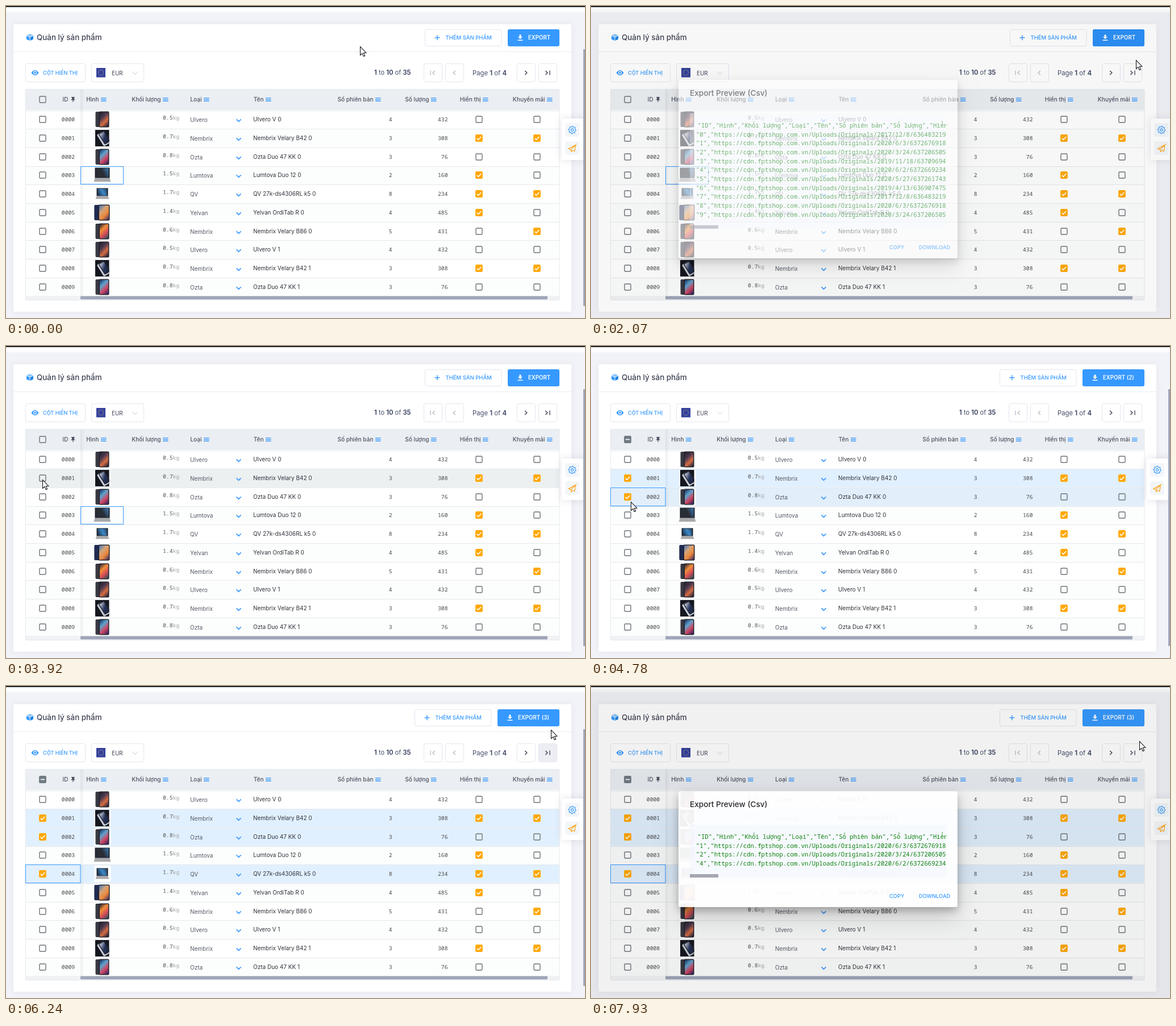
These frames come from a looping animation (1019x549 px, 8000 ms). An HTML page with a canvas:

```html
<!DOCTYPE html>
<html lang="vi">
<head>
<meta charset="utf-8">
<title>Quản lý sản phẩm</title>
<style>
html, body { margin: 0; width: 100%; height: 100%; overflow: hidden; background: #f2f3f8; }
canvas { display: block; width: 1019px; height: 549px; }
</style>
</head>
<body>
<canvas id="stage" width="1019" height="549"></canvas>
<script>
const ctx = document.getElementById('stage').getContext('2d');
const W = 1019, H = 549, LOOP = 8000, TICK = 77;
const SANS = 'Inter, "Open Sans", sans-serif';
const MONO = '"Noto Sans Mono", "DejaVu Sans Mono", monospace';
const BLUE = '#3699ff', ORANGE = '#ffa800', LINE = '#e4e6ef', DARK = '#3f4254', GREY = '#9fa5b9';
const TOP = 183.5, PITCH = 32.7, COUNT = 10;

// the table repeats these products, numbering each round
const products = [
  { type: 'Ulvero', name: 'Ulvero V', kg: '0.5', forms: '4', stock: '432', file: '2017/12/8/636483219',
    look: 'phone', colors: ['#27232f', '#4d3950', '#d66c43', '#2a2638'] },
  { type: 'Nembrix', name: 'Nembrix Velary B42', kg: '0.7', forms: '3', stock: '308', shown: true, sale: true,
    file: '2020/6/3/6372676918', look: 'tilted', colors: ['#c9cfdb', '#26345c', '#1b2238'] },
  { type: 'Ozta', name: 'Ozta Duo 47 KK', kg: '0.8', forms: '3', stock: '76', file: '2020/3/24/637206505',
    look: 'phone', colors: ['#1d3b6b', '#5fa3cc', '#d14460', '#3a2560'] },
  { type: 'Lumtova', name: 'Lumtova Duo 12', kg: '1.5', forms: '2', stock: '160', shown: true,
    file: '2019/11/18/63709694', look: 'laptop', size: 13, colors: ['#282d36', '#282d36', '#3f89c9'] },
  { type: 'QV', name: 'QV 27k-ds4306RL k5', kg: '1.7', forms: '8', stock: '234', shown: true, sale: true,
    file: '2020/6/2/6372669234', look: 'laptop', size: 10, colors: ['#17283d', '#3d88c6', '#21364d'] },
  { type: 'Yelvan', name: 'Yelvan OrdiTab R', kg: '1.4', forms: '4', stock: '485', shown: true,
    file: '2020/5/27/637261743', look: 'tablet', colors: ['#4f79b4', '#d3a577', '#ec873b', '#4a3463'] },
  { type: 'Nembrix', name: 'Nembrix Velary B86', kg: '0.6', forms: '5', stock: '431', sale: true,
    file: '2019/4/13/636907475', look: 'phone', colors: ['#3c2d35', '#f08e3a', '#d54c58', '#314f55'] }
];
const rows = Array.from({ length: COUNT }, (_, i) => {
  const p = products[i % products.length];
  return { ...p, id: i, name: `${p.name} ${Math.floor(i / products.length)}` };
});
const columns = {
  'Hình': 167, 'Khối lượng': 276, 'Loại': 348, 'Tên': 457,
  'Số phiên bản': 650, 'Số lượng': 748, 'Hiển thị': 839, 'Khuyến mãi': 952
};

// pointer stops: arrival time, x, y
const stops = [
  [380, 623, 71], [1150, 925, 57], [1880, 934, 60], [2000, 959, 95], [2450, 959, 95],
  [3229, 831, 163], [3922, 64, 235], [4560, 67, 266], [4769, 70, 274], [4930, 66, 334],
  [5390, 66, 335], [6080, 958, 125], [6232, 959, 77], [6420, 932, 58], [6950, 935, 60], [7150, 965, 97]
];
const clicks = [[3990, 1], [4600, 2], [5380, 4]];

const clamp = v => Math.max(0, Math.min(1, v));
const ease = k => k * k * (3 - 2 * k);
const rowTop = i => Math.round(TOP + PITCH * i);
const rowMid = i => Math.floor(TOP + PITCH * (i + 0.5)) + 0.5;

function pointer(t) {
  const next = stops.findIndex(s => s[0] > t);
  const b = stops.at(next), a = next > 0 ? stops[next - 1] : b;
  const k = ease(clamp((t - a[0]) / (b[0] - a[0] || 1)));
  return { x: a[1] + (b[1] - a[1]) * k, y: a[2] + (b[2] - a[2]) * k };
}

const inside = (p, x, y, w, h) => p.x >= x && p.x < x + w && p.y >= y && p.y < y + h;

// hover colour that lingers for a few ticks
function heat(t, ...area) {
  return [0, 1, 2].filter(n => inside(pointer(t - n * TICK), ...area)).length / 3;
}

function rect(x, y, w, h, color) {
  ctx.fillStyle = color;
  ctx.fillRect(x, y, w, h);
}

function paint(fill, stroke, lw = 1) {
  if (fill) { ctx.fillStyle = fill; ctx.fill(); }
  if (stroke) { ctx.strokeStyle = stroke; ctx.lineWidth = lw; ctx.stroke(); }
}

function box(x, y, w, h, r, ...style) {
  ctx.beginPath();
  ctx.roundRect(x, y, w, h, r);
  paint(...style);
}

function circle(x, y, r, ...style) {
  ctx.beginPath();
  ctx.arc(x, y, r, 0, Math.PI * 2);
  paint(...style);
}

function poly(x, y, pts, ...style) {
  ctx.beginPath();
  pts.forEach(([px, py]) => ctx.lineTo(x + px, y + py));
  if (style[0]) ctx.closePath();
  paint(...style);
}

function chevron(x, y, w, h, color, lw) {
  poly(x, y, [[-w, -h], [0, h], [w, -h]], null, color, lw);
}

function withAlpha(a, fn) {
  ctx.save();
  ctx.globalAlpha *= a;
  fn();
  ctx.restore();
}

// shadow only, kept outside the box so nothing shows through it
function glow(x, y, w, h, color, blur, dy) {
  ctx.save();
  ctx.beginPath();
  ctx.rect(0, 0, W, H);
  ctx.roundRect(x, y, w, h, 4);
  ctx.clip('evenodd');
  ctx.shadowColor = color;
  ctx.shadowBlur = blur;
  ctx.shadowOffsetY = dy;
  box(x, y, w, h, 4, '#fff');
  ctx.restore();
}

// y is the middle of the capitals
function text(s, x, y, size, color, weight = 400, font = SANS, align = 'left') {
  ctx.font = `${weight} ${size}px ${font}`;
  ctx.fillStyle = color;
  ctx.textAlign = align;
  ctx.fillText(s, x, y + size * 0.36);
  return ctx.measureText(s).width;
}
const mono = (s, x, y, color, align) => text(s, x, y, 9.75, color, 400, MONO, align);

function runs(x, y, size, ...parts) {
  for (const s of parts) x += text(s, x, y, size, '#464e6b', /\d/.test(s) ? 700 : 400);
}

function gradient(x0, y0, x1, y1, colors) {
  const g = ctx.createLinearGradient(x0, y0, x1, y1);
  colors.forEach((c, i) => g.addColorStop(i / (colors.length - 1), c));
  return g;
}

function check(x, y, state) {
  if (!state) return box(x - 5.5, y - 5.5, 11, 11, 1.5, null, '#6f7378', 1.4);
  box(x - 6.4, y - 6.4, 12.8, 12.8, 2, state === 'some' ? '#707b83' : ORANGE);
  if (state === 'some') rect(x - 3.6, y - 0.8, 7.2, 1.6, '#fff');
  else poly(x, y, [[-3.8, 0.2], [-1.3, 2.8], [3.9, -2.6]], null, '#fff', 1.5);
}

function device(x, y, w, h, colors) {
  box(x - w / 2, y - h / 2, w, h, 2, '#23232c');
  rect(x - w / 2 + 1.5, y - h / 2 + 1.5, w - 3, h - 3, gradient(x - w / 2, y - h / 3, x + w / 2, y + h / 3, colors));
}

function picture({ look, colors, size }, y) {
  const x = 169.5;
  rect(x - 14, y - 14.5, 29, 29, '#fff');
  if (look === 'tilted') {
    ctx.save();
    ctx.beginPath();
    ctx.rect(x - 12.5, y - 14.5, 24.5, 29);
    ctx.clip();
    rect(x - 13, y - 15, 26, 30, '#15171f');
    ctx.translate(x + 2, y);
    ctx.rotate(-0.55);
    box(-7, -11, 13, 24, 2, colors[0]);
    device(2, 0, 12, 22, colors);
    ctx.restore();
  } else if (look === 'laptop') {
    rect(x - size, y - size, size * 2, size * 1.4, '#1c222c');
    rect(x - size + 2, y - size + 1, size * 2 - 4, size * 1.2, gradient(x - size, y, x + size, y - size, colors));
    poly(x, y, [[-size, size * 0.4], [size, size * 0.4], [size + 2, size * 0.9], [-size - 2, size * 0.9]], '#a9a9ac');
  } else {
    const shift = look === 'tablet' ? 9.5 : 3;
    box(x - 11 - shift / 3, y - 13.5, 16, 27, 2, look === 'tablet' ? '#202b50' : '#383943');
    device(x + 3, y, look === 'tablet' ? 20 : 18, 28, colors);
  }
}

function cubeIcon(x, y) {
  poly(x, y, [[0, -6], [6, -3.4], [0, -0.8], [-6, -3.4]], '#8fc7ff');
  for (const s of [-1, 1]) {
    poly(x, y, [[6 * s, -2.4], [0.5 * s, 0], [0.5 * s, 6], [6 * s, 3.4]], s < 0 ? BLUE : '#2186e8');
  }
}

function eyeIcon(x, y) {
  ctx.beginPath();
  ctx.moveTo(x - 6.5, y);
  ctx.quadraticCurveTo(x, y - 9, x + 6.5, y);
  ctx.quadraticCurveTo(x, y + 9, x - 6.5, y);
  paint(BLUE);
  circle(x, y, 3, '#fff');
  circle(x, y, 1.8, BLUE);
}

function pinIcon(x, y, color) {
  rect(x - 3, y - 4, 6, 1.3, color);
  rect(x - 2, y - 3, 4, 4, color);
  rect(x - 3.5, y + 0.5, 7, 1.2, color);
  rect(x - 0.6, y + 1, 1.2, 4, color);
}

function downloadIcon(x, y) {
  rect(x - 1.5, y - 5, 3, 4, '#fff');
  poly(x, y, [[-4, -1.2], [4, -1.2], [0, 2.8]], '#fff');
  rect(x - 4.5, y + 4, 9, 1.5, '#fff');
}

function gearIcon(x, y) {
  const pts = Array.from({ length: 33 }, (_, i) => {
    const a = i * Math.PI / 16, r = i % 4 < 2 ? 6.6 : 5.1;
    return [Math.cos(a) * r, Math.sin(a) * r];
  });
  poly(x, y, pts, null, BLUE, 1.1);
  circle(x, y, 2.1, null, BLUE, 1.1);
}

function planeIcon(x, y) {
  poly(x, y, [[-2.5, 2.3], [6, -6], [-6.5, 0.5], [-2.5, 2.3], [-1.5, 6], [0.8, 3.4], [4.2, 5], [6, -6]], null, '#f9a21a', 1.2);
}

function pagerButton(x, dir, toEnd, on, hot) {
  box(x - 15.5, 101.5, 32, 32, 3, '#fff', LINE);
  withAlpha(hot, () => box(x - 15.5, 101.5, 32, 32, 3, '#e4e4ef'));
  const color = on ? DARK : '#b9bcc8', tip = x + dir * (toEnd ? 0 : 1.8);
  poly(tip, 117.5, [[-dir * 3.6, -3.6], [0, 0], [-dir * 3.6, 3.6]], null, color, 1.4);
  if (toEnd) rect(x + dir * 4 - 0.6, 113.5, 1.3, 8, color);
}

function drawHeader(count, t) {
  cubeIcon(42, 55);
  text('Quản lý sản phẩm', 54, 55, 13.4, DARK, 500);
  rect(13, 80, 982, 1, '#ebedf3');
  const dx = count ? -18 : 0;
  box(737.5 + dx, 41.5, 134.5, 29, 3, '#fff', LINE);
  rect(754.5 + dx, 55, 9, 1.4, BLUE);
  rect(758.3 + dx, 51.2, 1.4, 9, BLUE);
  text('THÊM SẢN PHẨM', 773.5 + dx, 56, 9.5, BLUE, 500);
  const area = [883 + dx, 41, 91 - dx, 30];
  box(...area, 3, BLUE);
  withAlpha(heat(t, ...area), () => box(...area, 3, '#187de4'));
  downloadIcon(905 + dx, 55.5);
  text(count ? `EXPORT (${count})` : 'EXPORT', 919 + dx, 56, 9.7, '#fff', 600);
}

function drawToolbar(hotLast) {
  box(34.5, 101.5, 105, 32, 3, '#fff', LINE);
  eyeIcon(51, 117.5);
  text('CỘT HIỂN THỊ', 65, 117.5, 9.1, BLUE, 500);
  box(150.5, 101.5, 92, 32, 3, '#fff', LINE);
  rect(159, 109, 16, 16.5, '#34419c');
  for (let a = 0; a < 6.2; a += Math.PI / 6) {
    circle(167 + Math.cos(a) * 4.6, 117.2 + Math.sin(a) * 4.6, 0.6, '#c9b977');
  }
  text('EUR', 186, 118, 9.8, DARK);
  chevron(227, 118, 4.5, 2.2, '#c6c8cf', 1);
  runs(648, 117.5, 11.1, '1', ' to ', '10', ' of ', '35');
  runs(821, 117.5, 11.3, 'Page ', '1', ' of ', '4');
  pagerButton(751, -1, true, false, 0);
  pagerButton(789, -1, false, false, 0);
  pagerButton(915, 1, false, true, 0);
  pagerButton(953, 1, true, true, hotLast);
}

function drawRow(r, i, on, hot) {
  const top = rowTop(i), y = rowMid(i);
  const plain = i % 2 ? '#fcfdfd' : '#fff';
  rect(34, top, 940, PITCH, on ? (hot ? '#e2eefa' : '#e1f0ff') : hot ? '#ecf0f1' : plain);
  rect(34, top, 940, 1, '#e5e8ec');
  check(64.5, y, on);
  mono('000' + i, 97.8, y, '#484848');
  picture(r, y);
  mono(r.kg, 276, y - 3.5, '#555');
  mono('kg', 305.2, y - 3.5, '#a2a2a2', 'right');
  text(r.type, 324, y + 1, 10, '#555a66');
  chevron(409.5, y + 1.8, 4, 2, BLUE, 1.7);
  text(r.name, 435, y - 0.5, 10, '#30323a');
  mono(r.forms, 679.5, y, '#484848', 'right');
  mono(r.stock, 777.5, y, '#484848', 'right');
  check(832.5, y, r.shown);
  check(934.5, y, r.sale);
}

function drawTable(chosen, hover) {
  rect(34, 146, 940, 37, '#ebeef2');
  check(64.5, 164.5, chosen.length ? 'some' : 0);
  text('ID', 99.5, 164, 10.1, '#4d5262', 500);
  pinIcon(118, 164, '#4d5262');
  for (const [name, icon] of Object.entries(columns)) {
    text(name, icon - 3.5, 164, 10.1, '#4d5262', 500, SANS, 'right');
    for (const k of [-1, 0, 1]) rect(icon, 164 + k * 2.7, 9.5, 1.3, BLUE);
  }
  rows.forEach((r, i) => drawRow(r, i, chosen.includes(i), i === hover));
  rect(131, 146, 7, 364, gradient(131, 0, 138, 0, ['rgba(60,70,90,.08)', 'rgba(60,70,90,0)']));
  rect(34, 510, 940, 8, '#f1f2f4');
  box(131, 510.5, 822, 5.8, 1, GREY);
  box(34.5, 146.5, 939.5, 371, 3, null, '#e6e9ee');
  if (chosen.length) box(34.5, rowTop(chosen.at(-1)) + 0.5, 96.5, 32, 0, null, BLUE);
  else box(131.5, rowTop(3) + 0.5, 75, 31, 0, null, BLUE);
}

function drawSide(x) {
  glow(x - 18.5, 198, 60, 73, 'rgba(82,63,105,.16)', 14, 0);
  box(x - 18.5, 198, 60, 73, 4, '#fff');
  for (const y of [206, 238]) box(x - 12.5, y, 25, 24, 3, '#f3f6f9');
  gearIcon(x, 218);
  planeIcon(x, 250.5);
}

function drawDialog(list, alpha) {
  rect(0, 0, W, H, `rgba(0,0,0,${0.055 * alpha})`);
  const line = 15.68, h = 157 + line * list.length, top = Math.round(287 - h / 2);
  const bottom = top + h, first = top + 80;
  withAlpha(alpha, () => {
    glow(154, top, 491, h, 'rgba(0,0,0,.24)', 14, 6);
    glow(154, top, 491, h, 'rgba(0,0,0,.16)', 38, 18);
    box(154, top, 491, h, 4, 'rgba(255,255,255,.94)');
    text('Export Preview (Csv)', 174, top + 23.5, 13.6, '#26272c', 500);
    rect(174, top + 59, 451, h - 111, 'rgba(243,246,255,.55)');
    rect(174, bottom - 58, 50, 6, '#a4a6b0');
    text('COPY', 525, bottom - 19.5, 9.3, BLUE, 500);
    text('DOWNLOAD', 577, bottom - 19.5, 9.3, BLUE, 500);
    ctx.beginPath();
    ctx.rect(174, top + 59, 451.5, h - 117);
    ctx.clip();
    const code = (s, x, n) => text(s, x, first + line * n, 10.63, '#0c800c', 400, MONO);
    code(['ID', ...Object.keys(columns)].map(s => `"${s}"`).join(','), 187.6, 0);
    list.forEach((r, i) => code(`"${r.id}","https://cdn.fptshop.com.vn/Uploads/Originals/${r.file}`, 184.8, i + 1));
  });
}

function drawPointer({ x, y }) {
  poly(x, y, [[0.5, 0.5], [0.5, 15.5], [4, 12.4], [6.2, 17.6], [8.6, 16.6], [6.4, 11.6], [10.8, 11.2]], '#fff', '#16161c', 1.1);
}

function dialogAlpha(t) {
  const fadeIn = start => 1 - (1 - clamp((t - start) / 240)) ** 2;
  return t < 5000 ? fadeIn(1990) * (1 - clamp((t - 3240) / 160)) : fadeIn(7080);
}

function draw(now) {
  // the screen advances in even ticks after a short rest
  const t = now < 366 ? 0 : 380 + Math.floor((now - 366) / TICK) * TICK;
  const p = pointer(t), alpha = dialogAlpha(t), open = alpha > 0;
  const chosen = clicks.filter(c => t >= c[0]).map(c => c[1]);
  const overTable = !open && inside(p, 34, TOP, 940, PITCH * COUNT);

  rect(0, 0, W, H, '#f2f3f8');
  rect(0, 2, W, 10, gradient(0, 2, 0, 12, ['#fff', '#fff', '#f6f7fa']));
  rect(0, 0, W, 2, '#222226');
  glow(13, 32, 982, 506, 'rgba(82,63,105,.08)', 12, 0);
  box(13, 32, 982, 506, 4, '#fff');
  drawHeader(chosen.length, t);
  drawToolbar(open ? 0 : heat(t, 937, 101, 32, 33));
  drawTable(chosen, overTable ? Math.floor((p.y - TOP) / PITCH) : -1);
  drawSide(open ? 1004 : 996.5);
  if (open) drawDialog(chosen.length ? chosen.map(i => rows[i]) : rows, alpha);
  else rect(1016, 76, 3, 452, GREY);
  drawPointer(p);
}

const begin = performance.now();
function tick() {
  draw((performance.now() - begin) % LOOP);
  requestAnimationFrame(tick);
}
tick();
</script>
</body>
</html>
```
